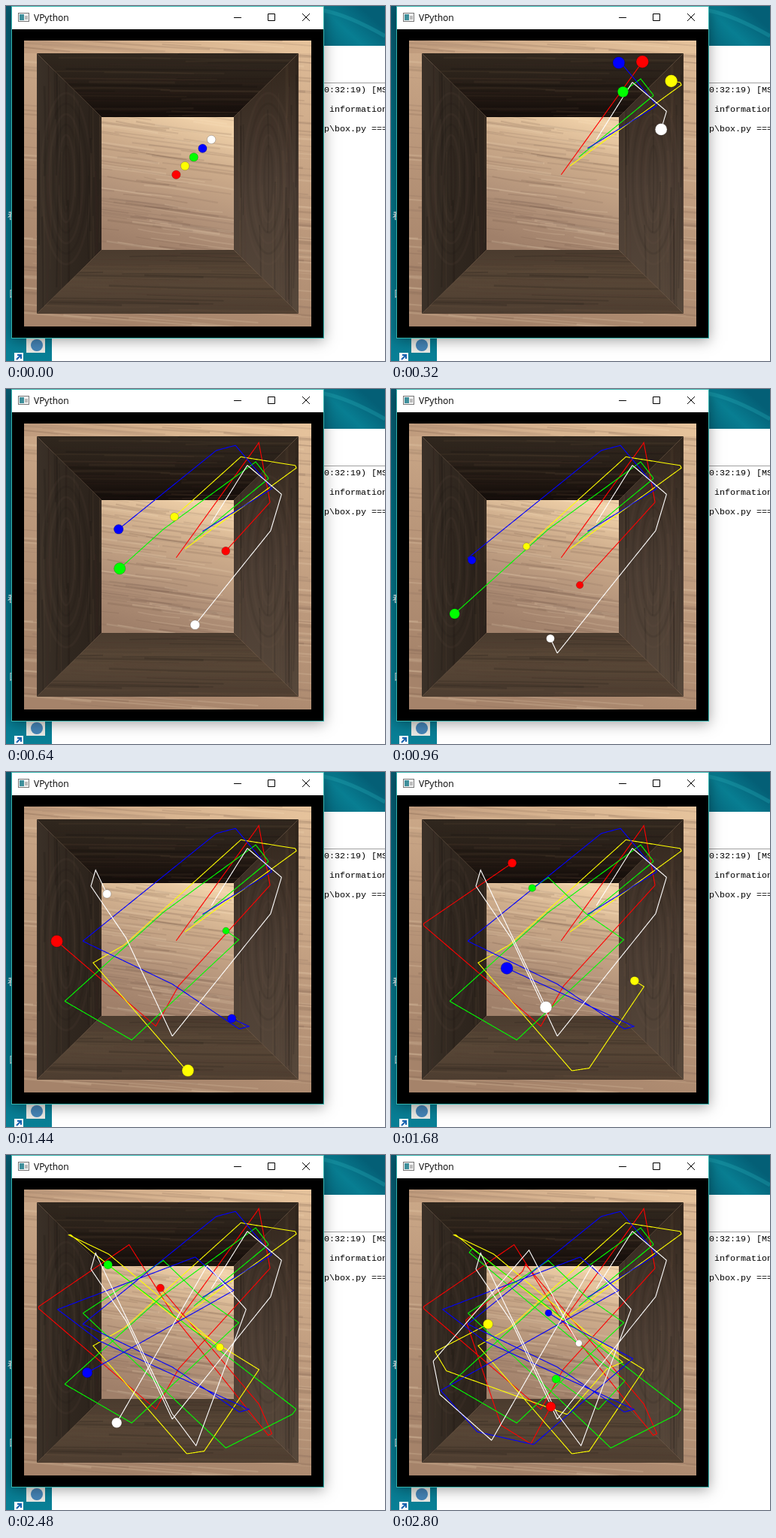
These frames come from a looping animation (504 by 473 pixels, 2960 ms). An HTML page with a canvas:

```html
<!DOCTYPE html>
<html lang="en">
<head>
<meta charset="utf-8">
<title>Balls in a box</title>
<style>
  html, body { margin: 0; width: 100%; height: 100%; overflow: hidden; background: #fff; }
  canvas { display: block; width: 504px; height: 473px; }
</style>
</head>
<body>
<canvas id="stage" width="504" height="473"></canvas>
<script>
const W = 504, H = 473, LOOP = 2960;
const ctx = document.getElementById('stage').getContext('2d');

// Moments (ms) at which the picture jumps
const STEPS = [0, 160, 240, 320, 480, 560, 640, 800, 960, 1200, 1440, 1520,
  1680, 1920, 2160, 2480, 2640, 2800];
// Screen time (ms) against simulation time
const PACE = [[0, 0], [320, 3.45], [640, 6.87], [960, 8.62], [1680, 19.5],
  [2160, 23.15], [2800, 44.6]];

// Camera and room
const CX = 214.6, CY = 236.5, FOCAL = 361, DIST = 12.34, SIDE = 4, RADIUS = 0.195;
const A = Math.SQRT1_2, B = 1, C = Math.sqrt(1.5);
const BALLS = [
  { color: '#f00', v: [A, B, C] },
  { color: '#ff0', v: [B, A, C] },
  { color: '#0f0', v: [C, B, A] },
  { color: '#00f', v: [C, A, B] },
  { color: '#fff', v: [A, C, B] }
];
BALLS.forEach((ball, i) => { ball.start = [0.4 * (i + 1), 0.4 * (i + 1), 0]; });

// Position of a point bouncing elastically between -SIDE and SIDE
function bounce(travel) {
  const p = (travel + SIDE) % (4 * SIDE);
  return p < 2 * SIDE ? p - SIDE : 3 * SIDE - p;
}

function locate(ball, t) {
  const [x, y, z] = ball.start.map((s, k) => bounce(s + ball.v[k] * t));
  const scale = FOCAL / (DIST - z);
  return { x: CX + x * scale, y: CY - y * scale, z, r: RADIUS * scale };
}

function simTime(ms) {
  for (let i = 1; i < PACE.length; i++) {
    const [m0, t0] = PACE[i - 1], [m1, t1] = PACE[i];
    if (ms <= m1) return t0 + (t1 - t0) * (ms - m0) / (m1 - m0);
  }
  return PACE[PACE.length - 1][1];
}

let seed = 7;
function rand(lo = 0, hi = 1) {
  seed = (seed * 16807) % 2147483647;
  return lo + (hi - lo) * seed / 2147483647;
}

function paintScene(g) {
  const fillRect = (color, x, y, w, h) => { g.fillStyle = color; g.fillRect(x, y, w, h); };

  function gradient(x0, y0, x1, y1, ...colors) {
    const grad = g.createLinearGradient(x0, y0, x1, y1);
    colors.forEach((c, i) => grad.addColorStop(i / (colors.length - 1), c));
    return grad;
  }

  function panel(points, fill, decorate) {
    g.save();
    g.beginPath();
    points.forEach(([x, y]) => g.lineTo(x, y));
    g.clip();
    g.fillStyle = fill;
    g.fillRect(0, 0, W, H);
    decorate();
    g.restore();
  }

  function stroke(color, width, draw) {
    g.strokeStyle = color;
    g.lineWidth = width;
    g.beginPath();
    draw();
    g.stroke();
  }

  // Streaks running across, sinking by `slope` over the full width
  function grainAcross(n, x, y, w, h, tones, slope) {
    for (let i = 0; i < n; i++) {
      const x0 = x + rand(-0.3, 0.7) * w, len = rand(0.3, 0.9);
      const y0 = y + rand() * (h + slope) - slope;
      const x1 = x0 + len * w, y1 = y0 + slope * len;
      stroke(tones[Math.floor(rand(0, tones.length))], rand(0.6, 3), () => {
        g.moveTo(x0, y0);
        g.quadraticCurveTo((x0 + x1) / 2, (y0 + y1) / 2 + rand(-4, 4), x1, y1);
      });
    }
  }

  function grainDown(n, x, y, w, h, tones) {
    for (let i = 0; i < n; i++) {
      const x0 = x + rand() * w, y0 = y + rand(-0.3, 0.7) * h, y1 = y0 + rand(0.3, 0.9) * h;
      stroke(tones[Math.floor(rand(0, tones.length))], rand(0.6, 3), () => {
        g.moveTo(x0, y0);
        g.quadraticCurveTo(x0 + rand(-4, 4), (y0 + y1) / 2, x0, y1);
      });
    }
  }

  function arches(cx) {
    for (let i = 1; i < 7; i++) {
      stroke(i % 2 ? 'rgba(0,0,0,.07)' : 'rgba(125,105,85,.07)', 3, () =>
        g.ellipse(cx, 230, i * 5.5, 30 + i * 14, 0, 0, 7));
    }
  }

  // Desktop
  fillRect(gradient(0, 0, 0, H, '#075a70', '#006b80', '#04758a', '#087f96'), 0, 0, W, H);
  fillRect(gradient(422, 53, 470, 0, '#04667c', '#087e92', '#045f76'), 422, 0, 82, 53);
  stroke('rgba(40,175,185,.3)', 5, () => {
    g.moveTo(422, 6);
    g.quadraticCurveTo(455, 12, W, 40);
  });
  g.fillStyle = '#fff';
  g.font = '12px "Noto Sans CJK SC", "Noto Sans CJK", sans-serif';
  g.fillText('看', 2, 284);
  g.fillText('口', 4, 388);

  // Shortcut icon
  fillRect('#e9e9e4', 27, 441, 25, 21);
  g.fillStyle = '#4584b6';
  g.beginPath();
  g.arc(41, 452, 8, 0, 7);
  g.fill();
  fillRect('#f4f8fb', 11, 462, 12, 11);
  stroke('#1762b0', 2, () => {
    g.moveTo(14, 471); g.lineTo(20, 465);
    g.moveTo(15, 465); g.lineTo(20, 465); g.lineTo(20, 470);
  });

  // Shell window behind
  fillRect('#fff', 61, 53, W - 61, H - 53);
  fillRect('#a0a0a0', 61, 102, W - 61, 1);
  g.fillStyle = '#000';
  g.font = '11.67px "Liberation Mono", monospace';
  ['0:32:19) [MS', ' information', 'p\\box.py ==='].forEach((line, i) =>
    g.fillText(line, 423, 115 + i * 26));

  // Front window
  g.save();
  g.shadowColor = 'rgba(0,0,0,.36)';
  g.shadowBlur = 17;
  g.shadowOffsetY = 3;
  fillRect('#35b4ae', 7, 0, 416, 443);
  g.restore();
  fillRect('#fff', 8, 1, 414, 30);
  fillRect('#000', 8, 31, 414, 411);
  fillRect('#777', 16, 9, 15, 12);
  fillRect('#f4f4f4', 17, 10, 13, 10);
  fillRect('#3f8f9b', 18, 11, 6, 8);
  fillRect('#bbb', 25, 13, 4, 5);
  g.fillStyle = '#000';
  g.font = '12px "Open Sans", sans-serif';
  g.fillText('VPython', 37, 20);
  stroke('#000', 1, () => {
    g.moveTo(303, 15.5); g.lineTo(313, 15.5);
    g.rect(348.5, 10.5, 9, 9);
    g.moveTo(394, 10); g.lineTo(404, 20);
    g.moveTo(404, 10); g.lineTo(394, 20);
  });

  // Wooden box: outer rim, four walls, back
  const rect = (x0, y0, x1, y1) => [[x0, y0], [x1, y0], [x1, y1], [x0, y1]];
  const lightTones = ['rgba(95,70,55,.15)', 'rgba(120,95,80,.15)', 'rgba(255,230,200,.15)'];
  const darkTones = ['rgba(0,0,0,.13)', 'rgba(115,90,65,.12)', 'rgba(85,45,40,.08)'];

  panel(rect(24, 46, 406, 427), gradient(330, 46, 190, 427, '#dcb995', '#bd9a7d', '#a5836a'), () => {
    fillRect(gradient(24, 0, 406, 0, '#bf9b7d', '#d8b490', '#e6c39c'), 24, 46, 382, 17);
    grainAcross(170, 24, 46, 382, 381, lightTones, 30);
  });
  panel([[41, 63], [389, 63], [303, 148], [127, 148]],
    gradient(0, 63, 0, 148, '#30271e', '#2b221a', '#211812', '#120c09'), () =>
    grainAcross(50, 41, 63, 348, 85, darkTones, 3));
  panel([[41, 63], [127, 148], [127, 325], [41, 410]],
    gradient(41, 0, 127, 0, '#3b3128', '#30271f', '#2b221b'), () => {
      grainDown(40, 41, 63, 86, 347, darkTones);
      arches(80);
    });
  panel([[389, 63], [303, 148], [303, 325], [389, 410]],
    gradient(315, 90, 355, 400, '#35291f', '#4b3d33', '#56473a'), () => {
      grainDown(40, 303, 63, 86, 347, darkTones);
      arches(349);
    });
  panel([[41, 410], [127, 325], [303, 325], [389, 410]],
    gradient(0, 325, 0, 410, '#4a3b2e', '#574636', '#4d3d30'), () =>
    grainAcross(50, 41, 325, 348, 85, darkTones, 5));
  panel(rect(127, 148, 303, 325),
    gradient(250, 148, 195, 325, '#f0d1a9', '#cbaa8a', '#b3937a', '#a0806a'), () =>
    grainAcross(110, 127, 148, 176, 177, lightTones, 24));
}

const scene = document.createElement('canvas');
scene.width = W;
scene.height = H;
paintScene(scene.getContext('2d'));

function drawTrail(ball, t) {
  ctx.strokeStyle = ball.color;
  ctx.lineWidth = 1.1;
  ctx.beginPath();
  for (let s = 0; s < t; s += 0.025) {
    const p = locate(ball, s);
    ctx.lineTo(p.x, p.y);
  }
  const end = locate(ball, t);
  ctx.lineTo(end.x, end.y);
  ctx.stroke();
}

function drawBall({ color, x, y, r }) {
  ctx.beginPath();
  ctx.arc(x, y, r, 0, 7);
  ctx.fillStyle = color;
  ctx.fill();
  ctx.strokeStyle = 'rgba(0,0,0,.3)';
  ctx.lineWidth = 0.7;
  ctx.stroke();
}

function render(ms) {
  const t = simTime(ms);
  ctx.drawImage(scene, 0, 0);
  BALLS.forEach(ball => drawTrail(ball, t));
  BALLS.map(ball => ({ color: ball.color, ...locate(ball, t) }))
    .sort((a, b) => a.z - b.z)
    .forEach(drawBall);
}

let shown = -1;
const origin = performance.now();
function tick() {
  const ms = (performance.now() - origin) % LOOP;
  const step = STEPS.filter(s => s <= ms).pop();
  if (step !== shown) render(shown = step);
  requestAnimationFrame(tick);
}
tick();
</script>
</body>
</html>
```
